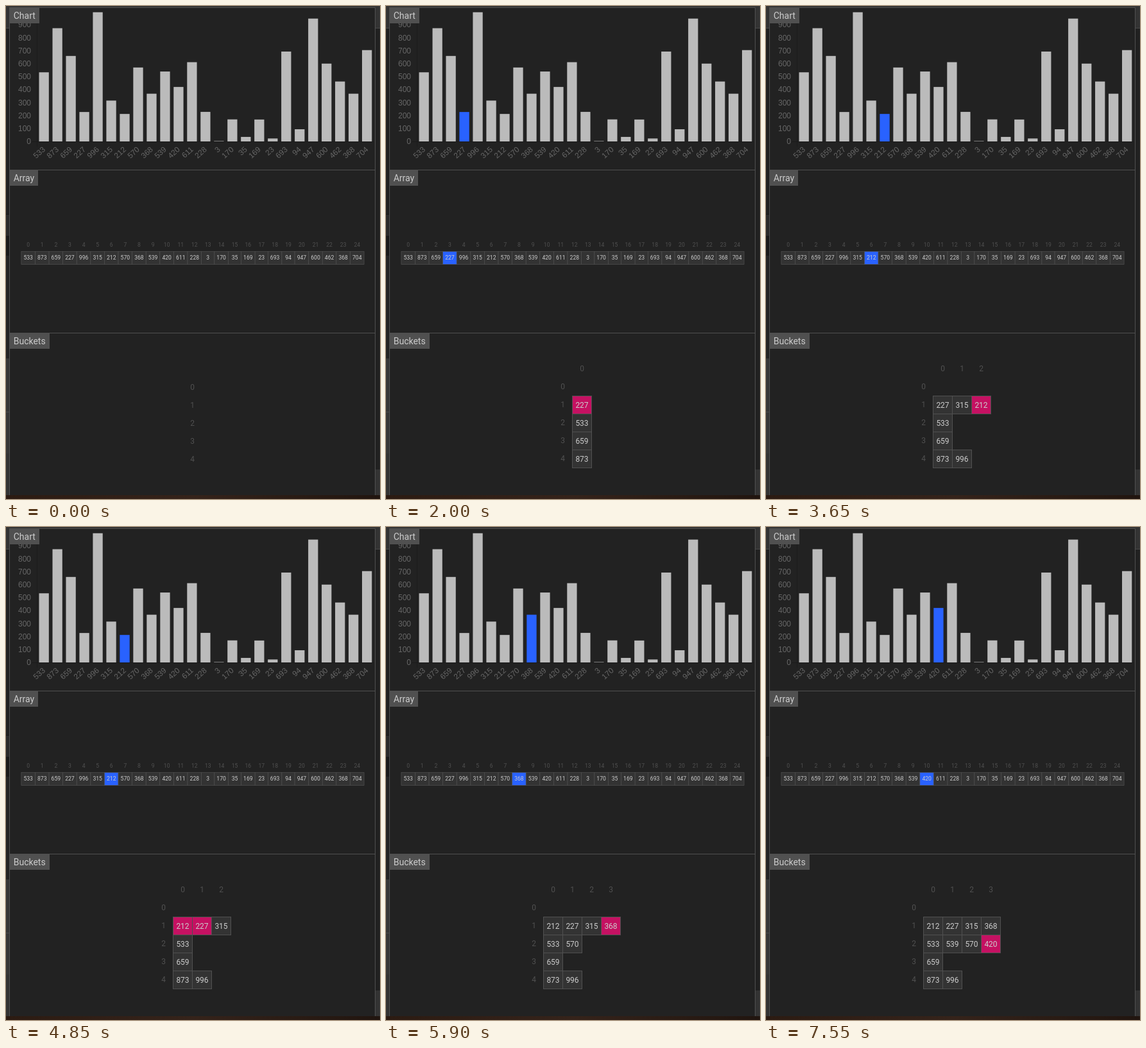
Recreate the animation shown at these times as an HTML page. Size 583x768 px, loop 8000 ms.

```html
<!DOCTYPE html>
<html lang="en">
<head>
<meta charset="utf-8">
<title>Bucket sort</title>
<style>
  html, body { margin: 0; width: 100%; height: 100%; overflow: hidden; background: #222; }
  svg { display: block; width: 583px; height: 768px; }
  text { font: 12px Roboto, sans-serif; fill: #ccc; text-anchor: middle; }
  .index { fill: #505050; }
  .axis text { font-family: "Liberation Sans", Arial, sans-serif; fill: #666; text-anchor: end; }
  .title { font-size: 14px; text-anchor: start; }
  .bar { fill: #bbb; }
  .cell { fill: #333; stroke: #505050; }
  .bar.on, .on .cell { fill: #2962ff; }
  .hot .cell { fill: #c51162; }
  .frame { fill: none; stroke: #505050; }
</style>
</head>
<body>
<svg viewBox="0 0 583 768">
  <defs>
    <linearGradient id="wood">
      <stop offset="0" stop-color="#2c1b12"/>
      <stop offset=".5" stop-color="#35231a"/>
      <stop offset="1" stop-color="#21150f"/>
    </linearGradient>
  </defs>
  <g id="page"></g>
  <rect x="6" y="3" width="569" height="759" fill="#222"/>
  <g id="chart"></g>
  <g id="array" transform="translate(23.5 361.8) scale(.72)"></g>
  <g id="buckets"></g>
  <path class="frame" d="M5.5 762V2.5H575.5V762M5.5 255.5H575.5M5.5 509.5H575.5"/>
  <g id="titles"></g>
</svg>
<script>
const LOOP = 8000;
const values = [533, 873, 659, 227, 996, 315, 212, 570, 368, 539, 420, 611, 228,
  3, 170, 35, 169, 23, 693, 94, 947, 600, 462, 368, 704];
const addTimes = [500, 950, 1550, 2000, 2600, 3200, 3650, 5300, 5900, 6500, 7550];
const swapTimes = [4250, 4850, 6950];

const $ = id => document.getElementById(id);
const range = n => [...Array(n).keys()];
const rect = (x, y, w, h, attrs) =>
  `<rect x="${x}" y="${y}" width="${w}" height="${h}" ${attrs}/>`;
const text = (x, y, s, attrs = '') => `<text x="${x}" y="${y}" ${attrs}>${s}</text>`;
const index = (x, y, s) => text(x, y + 4, s, 'class="index"');
const cell = (x, y, w, s, state = '') =>
  `<g class="${state}">${rect(x + .5, y + .5, w, 28, 'class="cell"')}` +
  `${text(x + .5 + w / 2, y + 18.5, s)}</g>`;

// Slivers of the page behind the panels
function drawPage() {
  const strip = (x, w, y, end, fill) => rect(x, y, w, end - y, `fill="${fill}"`);
  $('page').innerHTML =
    strip(0, 583, 0, 768, '#212121') +
    strip(0, 583, 0, 35, '#333') +
    strip(0, 583, 34, 35, '#484848') +
    strip(0, 6, 324, 358, '#2a2a2a') +
    strip(0, 6, 324, 325, '#171717') +
    strip(0, 6, 358, 389, '#1a1a1a') +
    strip(0, 6, 389, 549, '#242424') +
    strip(0, 6, 549, 697, '#373737') +
    strip(0, 6, 632, 633, '#4a4a4a') +
    strip(0, 6, 697, 762, '#333') +
    strip(576, 7, 722, 762, '#333') +
    strip(0, 583, 762, 768, 'url(#wood)');
}

function drawChart() {
  const base = 211, unit = .2021, step = 20.98;
  const scale = range(10).map(k => text(39, base + 4.3 - k * 100 * unit, k * 100));
  const bars = values.map((v, i) =>
    rect(51.5 + i * step, base - v * unit, 15.3, v * unit, 'class="bar"'));
  const names = values.map((v, i) =>
    text(0, 4, v, `transform="translate(${59.3 + i * step} 221.5) rotate(-42)"`));
  $('chart').innerHTML =
    '<path d="M48.5 3V219M40 211.5H573" stroke="#000" stroke-opacity=".2"/>' +
    bars.join('') + `<g class="axis">${scale.join('')}${names.join('')}</g>`;
}

function drawArray() {
  let x = 0, cells = '', indices = '';
  values.forEach((v, i) => {
    const w = v < 100 ? 28 : 30;
    cells += cell(x, 28, w, v, 'item');
    indices += index(x + w / 2 + .5, 14.5, i);
    x += w;
  });
  $('array').innerHTML = indices + cells;
}

function drawTitles() {
  const title = (y, w, s) => rect(6, y, w, 24, 'fill="#505050"') +
    text(11.7, y + 17, s, 'class="title"');
  $('titles').innerHTML = title(3, 46, 'Chart') + title(256, 44, 'Array') + title(510, 62, 'Buckets');
}

// Replay every insertion and swap up to time t
function stateAt(t) {
  const rows = range(5).map(() => []);
  let current = -1, row = -1, hot = [];
  const events = [...addTimes, ...swapTimes].sort((a, b) => a - b).filter(e => e <= t);
  for (const e of events) {
    if (swapTimes.includes(e)) {
      const r = rows[row], p = hot[0];
      [r[p - 1], r[p]] = [r[p], r[p - 1]];
      hot = [p - 1, p];
    } else {
      const v = values[++current];
      row = Math.floor(v / 200);
      hot = [rows[row].push(v) - 1];
    }
  }
  return { rows, current, row, hot, count: events.length };
}

function drawBuckets({ rows, row, hot }) {
  const n = Math.max(...rows.map(r => r.length));
  const left = 305 - 15 * n;
  let out = range(n).map(c => index(left + 15.5 + 30 * c, 565.2, c)).join('');
  rows.forEach((r, k) => {
    out += index(left - 14.5, (n ? 593.2 : 594.2) + 28 * k, k);
    r.forEach((v, c) => {
      const state = k === row && hot.includes(c) ? 'hot' : '';
      out += cell(left + 30 * c, 579 + 28 * k, 30, v, state);
    });
  });
  $('buckets').innerHTML = out;
}

drawPage();
drawChart();
drawArray();
drawTitles();

const bars = document.querySelectorAll('.bar');
const items = document.querySelectorAll('.item');
const start = performance.now();
let shown = -1;

function tick() {
  const s = stateAt((performance.now() - start) % LOOP);
  if (s.count !== shown) {
    shown = s.count;
    bars.forEach((b, i) => b.classList.toggle('on', i === s.current));
    items.forEach((c, i) => c.classList.toggle('on', i === s.current));
    drawBuckets(s);
  }
  requestAnimationFrame(tick);
}
tick();
</script>
</body>
</html>
```
